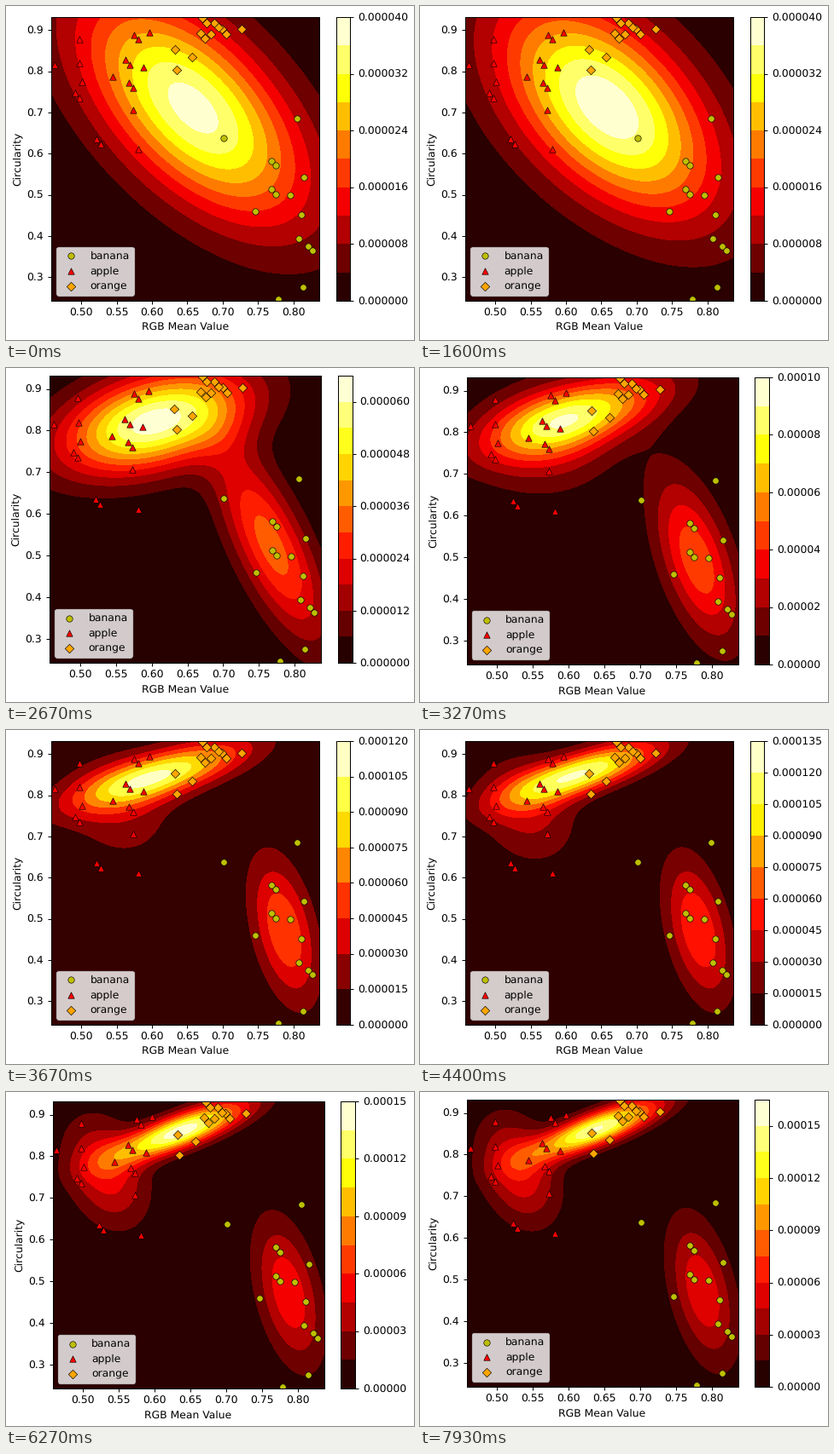
These frames come from a looping animation (478 px wide and 392 px high, 8 s). A matplotlib script:

```python
import matplotlib.pyplot as plt
import numpy as np
from matplotlib.animation import FuncAnimation

W, H, DPI = 478, 392, 64
S = 89 / DPI  # scale of all point sizes
STEPS, LOOP = 120, 8000
APART, SPLIT = 40, 55  # steps: bananas part, then apples and oranges
CELL = 0.002**2  # area of a grid cell, turns density into probability
XLIM, YLIM = (.4576, .8364), (.2430, .9318)

plt.rcParams.update({
    "font.family": "DejaVu Sans", "font.size": 10 * S,
    "text.hinting": "none", "patch.linewidth": S,
    "axes.linewidth": 0.8 * S, "axes.labelpad": 4 * S,
    **{f"{a}tick.major.{k}": v * S for a in "xy"
       for k, v in (("size", 3.5), ("width", 0.8), ("pad", 3.5))},
})


def fruit(pairs, singles):
    """Lone samples, and close pairs given by their middle."""
    mid, off = np.array(pairs), np.array([.003, -.006])
    return np.vstack([mid - off, mid + off, singles])


BANANA = fruit(
    [(.772, .577), (.772, .507), (.824, .370)],
    [(.805, .685), (.701, .638), (.815, .542), (.795, .499), (.746, .460),
     (.811, .452), (.808, .394), (.814, .276), (.779, .247)])
APPLE = fruit(
    [(.578, .883), (.566, .822), (.570, .766), (.494, .742), (.525, .630)],
    [(.463, .816), (.497, .878), (.498, .820), (.501, .775), (.596, .894),
     (.588, .809), (.544, .787), (.573, .707), (.581, .610)])
ORANGE = fruit(
    [(.674, .923), (.691, .912), (.702, .897), (.672, .886)],
    [(.727, .903), (.683, .890), (.657, .835), (.632, .853), (.635, .804)])

# Components as weight, mean x, mean y, sd x, sd y, correlation
BANANA_FIT = (.32, .787, .473, .0326, .121, -.43)
SAME = np.array([(1 / 3, .658, .711, .1094, .190, -.585)] * 3)
TWO = np.array([(.30, .767, .525, .053, .160, -.73),
                (.36, .612, .826, .088, .080, .45),
                (.31, .592, .815, .085, .088, .30)])
THREE = np.array([BANANA_FIT,
                  (.49, .612, .850, .083, .056, .73),
                  (.19, .555, .765, .055, .090, -.10)])
FINAL = np.array([BANANA_FIT,
                  (.40, .640, .862, .060, .047, .80),
                  (.29, .530, .762, .038, .088, -.30)])


def lerp(a, b, s):
    return a + (b - a) * s


def state(i):
    """Mixture and height of its peak at step i."""
    if i < APART:
        s = i / APART
        return lerp(SAME, TWO, s**4), lerp(3.79e-5, 6.4e-5, s**5.7)
    if i < SPLIT:
        s = (i - APART) / (SPLIT - APART)
        return lerp(TWO, THREE, s), lerp(6.4e-5, 11.15e-5, s)
    left = 1 - (i - SPLIT) / (STEPS - 1 - SPLIT)
    return (lerp(FINAL, THREE, left**2.6),
            lerp(15.15e-5, 11.15e-5, left**1.8))


xs, ys = np.linspace(*XLIM, 115), np.linspace(*YLIM, 165)
GX, GY = np.meshgrid(xs, ys)


def surface(i):
    comps, peak = state(i)
    z = 0
    for w, mx, my, sx, sy, rho in comps:
        u, v, k = (GX - mx) / sx, (GY - my) / sy, 1 - rho**2
        q = (u * u - 2 * rho * u * v + v * v) / k
        z = z + w * CELL * np.exp(-q / 2) / (2 * np.pi * sx * sy * k**.5)
    return z * peak / z.max()


fig = plt.figure(figsize=(W / DPI, H / DPI), dpi=DPI, facecolor="white")
ax, bar = fig.add_axes([.1, .1, .6, .8]), fig.add_axes([.8, .1, .04, .8])
ax.set(xlim=XLIM, ylim=YLIM, xlabel="RGB Mean Value", ylabel="Circularity")
ax.set_xticks(np.arange(.5, .81, .05))
ax.set_yticks(np.arange(.3, .91, .1))
for pts, mark, color, name in ((BANANA, "o", "y", "banana"),
                               (APPLE, "^", "r", "apple"),
                               (ORANGE, "D", "orange", "orange")):
    ax.scatter(*pts.T, s=36 * S * S, marker=mark, c=color, label=name,
               edgecolors="black", linewidths=0.5 * S, zorder=2)
ax.legend(loc="lower left")
fills = []


def place(axes, left, top, width, height):
    axes.set_position([left / W, 1 - (top + height) / H,
                       width / W, height / H])


def arrange(short, topped):
    """The page is fitted to the bar's labels: their length and the top one."""
    shrunk = topped and not short
    left = 54.5 if short else 53 if topped else 51
    top = 9 + 2 * topped + 2 * shrunk
    width = 314 if shrunk else 318
    height = 1.06 * width
    place(ax, left, top, width, height)
    place(bar, left + width * 17 / 16, top, height / 20, height)


def draw_bar(levels):
    ticks = levels[::1 if len(levels) <= 10 else 2]
    short = np.allclose(ticks * 1e5, np.round(ticks * 1e5))
    mids = (levels[1:] + levels[:-1]) / 2
    bar.clear()
    bar.pcolormesh([0, 1], levels, mids[:, None], cmap="hot",
                   vmin=levels[0], vmax=levels[-1])
    bar.set(xticks=[], xlim=(0, 1), ylim=(levels[0], levels[-1]))
    bar.yaxis.tick_right()
    bar.set_yticks(ticks, [f"{t:.{5 if short else 6}f}" for t in ticks])
    arrange(bool(short), bool(ticks[-1] == levels[-1]))


def draw(i):
    while fills:
        fills.pop().remove()
    fills.append(ax.contourf(xs, ys, surface(i), 10, cmap="hot", zorder=0))
    draw_bar(fills[0].levels)
    return []


anim = FuncAnimation(fig, draw, frames=STEPS, init_func=lambda: draw(0),
                     interval=LOOP / STEPS, repeat=True, repeat_delay=0,
                     blit=False)
plt.show()
```
